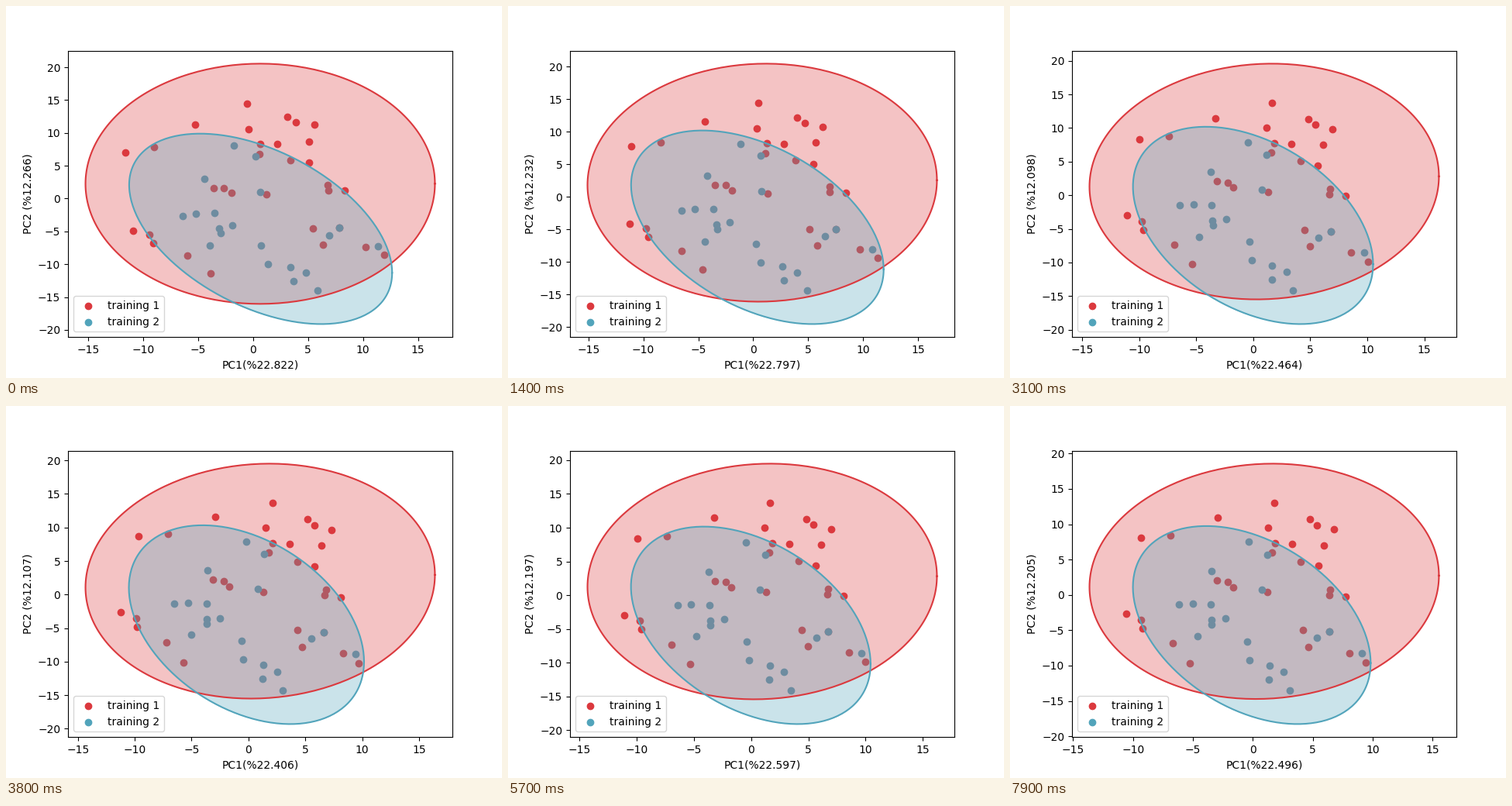
These frames come from a looping animation (640x480 px, 8 s). A matplotlib script:

```python
import numpy as np
import matplotlib.pyplot as plt
from matplotlib.animation import FuncAnimation

FRAMES, STEP = 80, 100
RED, BLUE = "#db393e", "#52a4bb"
SWAP, LEVEL, SHRINK = 2.0, 3.8, 4.8  # seconds
K95 = np.sqrt(-2 * np.log(0.05))  # radius of the 95% confidence ellipse
RING = np.linspace(0, 2 * np.pi, 241)
CIRCLE = np.array([np.cos(RING), np.sin(RING)])

# sample scores at the moment the axes stand level
red = np.array([
    (-9.7, 8.7), (-7.1, 9.0), (-2.9, 11.6), (2.1, 13.7), (1.5, 10.0),
    (5.2, 11.2), (5.8, 10.3), (7.3, 9.6), (6.4, 7.3), (3.6, 7.5),
    (2.1, 7.7), (1.8, 6.3), (4.3, 4.9), (5.8, 4.2), (6.7, -0.1),
    (6.8, 0.7), (8.1, -0.4), (1.3, 0.4), (-3.1, 2.2), (-1.7, 1.2),
    (-2.2, 2.0), (-11.2, -2.6), (-9.9, -3.5), (-9.8, -4.8), (-7.2, -7.1),
    (-5.7, -10.1), (4.3, -5.3), (6.6, -5.6), (4.7, -7.8), (8.3, -8.8),
    (9.7, -10.2)]).T
blue = np.array([
    (-0.2, 7.9), (1.4, 6.0), (-3.6, 3.6), (0.8, 0.8), (-6.5, -1.3),
    (-5.3, -1.2), (-3.7, -1.4), (-2.5, -3.5), (-3.7, -3.7), (-3.7, -4.4),
    (-5.0, -6.0), (-0.6, -6.9), (-0.5, -9.7), (1.3, -10.5), (1.2, -12.6),
    (2.5, -11.5), (3.0, -14.3), (5.5, -6.5), (6.6, -5.6), (9.4, -8.9)]).T

# explained variance of both components over time
SHARE_T = [0, 1.4, 2.4, 3.8, 4.8, 6.7, 7.9]
SHARE_1 = [22.822, 22.797, 22.523, 22.406, 22.512, 22.691, 22.496]
SHARE_2 = [12.266, 12.232, 12.089, 12.107, 12.125, 12.277, 12.205]


def turn(t):
    """Angle of the scores: a steady turn to level, then a slight sway."""
    if t < LEVEL:
        return 0.19 * (1 - t / LEVEL)
    return 0.034 * np.sin(np.pi * (t - LEVEL) / 5)


def spread(t):
    """Scale of the scores: drops when the data is swapped, shrinks late."""
    if t < SWAP:
        return 1.04
    return 1 - 0.05 * (max(t - SHRINK, 0) / 3.1) ** 2


def pose(pts, t):
    c, s = np.cos(turn(t)), np.sin(turn(t))
    return spread(t) * np.array([[c, -s], [s, c]]) @ pts


def ellipse(pts):
    root = np.linalg.cholesky(np.cov(pts))
    return pts.mean(axis=1)[:, None] + K95 * root @ CIRCLE


class Group:
    def __init__(self, ax, base, color, label, order):
        self.base = base
        self.dots = ax.scatter([], [], color=color, label=label, zorder=1)
        self.area, = ax.fill([0, 1, 1], [0, 0, 1], color=color, alpha=0.3,
                             lw=0, zorder=1.1 + order)
        self.edge, = ax.plot([], [], color=color, lw=1.5, zorder=2 + order)

    def move(self, t):
        pts = pose(self.base, t)
        outline = ellipse(pts)
        self.dots.set_offsets(pts.T)
        self.area.set_xy(outline.T)
        self.edge.set_data(*outline)
        return outline


def padded(values):
    lo, hi = values.min(), values.max()
    pad = 0.05 * (hi - lo)
    return lo - pad, hi + pad


fig, ax = plt.subplots(figsize=(6.4, 4.8), dpi=100)
groups = [Group(ax, red, RED, "training 1", 0),
          Group(ax, blue, BLUE, "training 2", 0.1)]
ax.legend(loc="lower left")


def update(n):
    t = n * STEP / 1000
    xs, ys = np.hstack([g.move(t) for g in groups])
    ax.set_xlim(padded(xs))
    ax.set_ylim(padded(ys))
    ax.set_xlabel(f"PC1(%{np.interp(t, SHARE_T, SHARE_1):.3f})")
    ax.set_ylabel(f"PC2 (%{np.interp(t, SHARE_T, SHARE_2):.3f})")


anim = FuncAnimation(fig, update, frames=FRAMES, interval=STEP,
                     init_func=lambda: update(0), repeat=True, repeat_delay=0)
plt.show()
```
